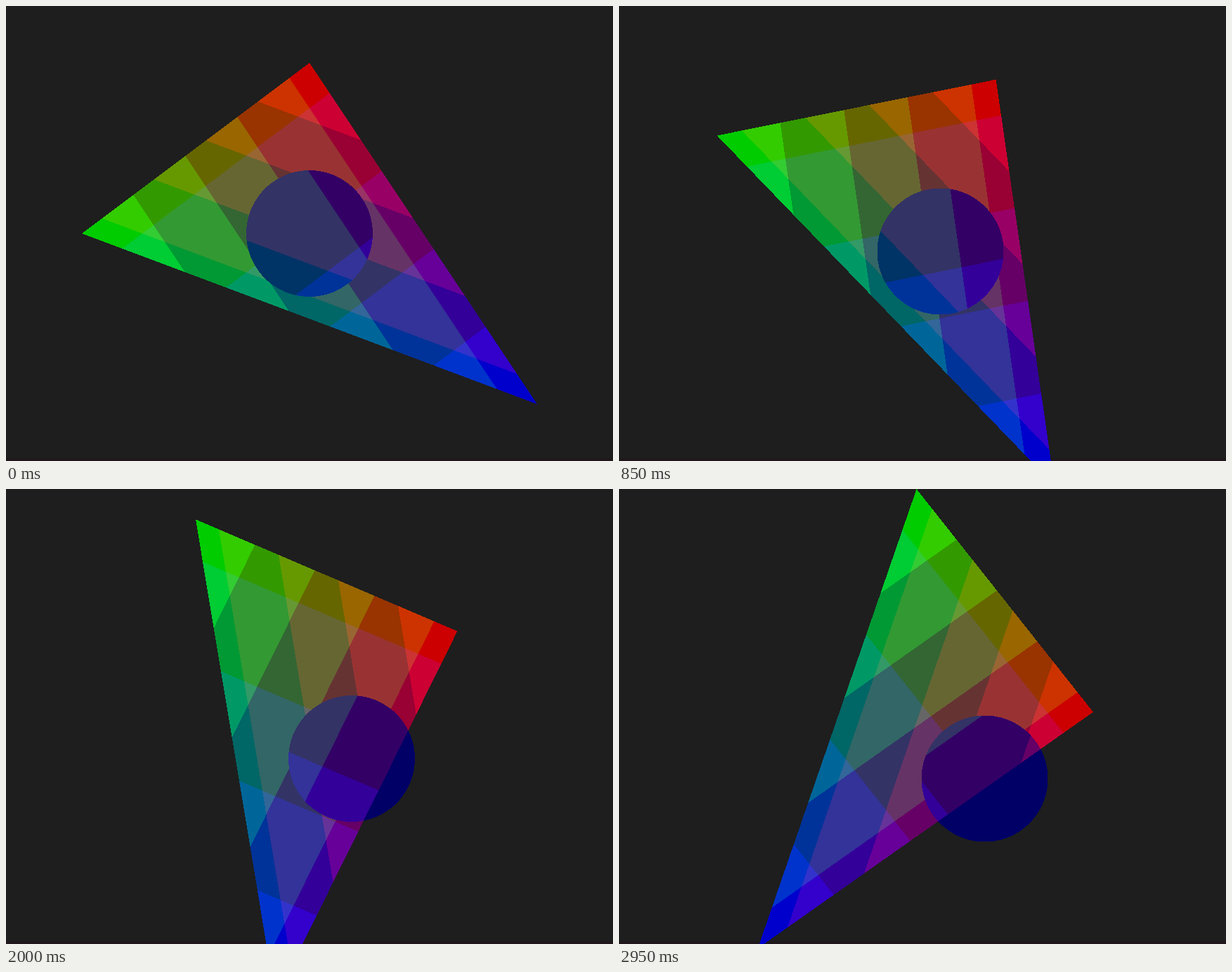
Animation of 864x648 px, one loop 3000 ms. Source, as an HTML page with a canvas:

```html
<!DOCTYPE html>
<html lang="en">
<head>
<meta charset="utf-8">
<title>Quantized triangle</title>
<style>
html, body { margin: 0; width: 100%; height: 100%; overflow: hidden; background: #1e1e1e; }
canvas { display: block; }
</style>
</head>
<body>
<canvas width="864" height="648"></canvas>
<script>
const W = 864, H = 648, STEP = 50, LOOP = 3000, RADIUS = 90;
const ctx = document.querySelector('canvas').getContext('2d');
const image = ctx.createImageData(W, H);
const pixels = new Uint32Array(image.data.buffer);

const rgb = (r, g, b) => (255 << 24 | b << 16 | g << 8 | r) >>> 0;
const BACK = rgb(30, 30, 30), STRIP = rgb(32, 24, 28), DISC = rgb(0, 0, 102);

// Corner weights become channel values in steps of 51.
const level = w => 51 * Math.floor((w - 0.0885) / 0.2283 + 1);
const dimLevel = w => 51 * Math.max(0, Math.floor((w - 0.2145) / 0.5705 + 1));

function draw(time) {
  const shift = time * 0.03; // degrees of turn, and pixels of disc travel
  const angle = shift * Math.PI / 180;
  const cos = Math.cos(angle), sin = Math.sin(angle);
  let i = 0;
  for (let row = 0; row < H; row++) {
    const y = row + 0.5 - H / 2;
    for (let col = 0; col < W; col++) {
      const x = col + 0.5 - W / 2;
      const u = x * cos + y * sin, v = y * cos - x * sin;
      const r = (0.375 * (u + 324) - v) / 364.5;
      const b = (v + 0.75 * u + 243) / 729;
      const g = 1 - r - b;
      const inTriangle = r >= 0 && g >= 0 && b >= 0;
      const inDisc = (x - shift) ** 2 + (y - shift) ** 2 < RADIUS * RADIUS;
      let color = row < H - 4 ? BACK : STRIP;
      if (inTriangle && inDisc) color = rgb(dimLevel(r), dimLevel(g), b < 0.433 ? 102 : 153);
      else if (inTriangle) color = rgb(level(r), level(g), level(b));
      else if (inDisc) color = DISC;
      pixels[i++] = color;
    }
  }
  ctx.putImageData(image, 0, 0);
}

let shown = -1;
function tick() {
  const time = Math.floor(performance.now() % LOOP / STEP) * STEP;
  if (time !== shown) draw(shown = time);
  requestAnimationFrame(tick);
}
tick();
</script>
</body>
</html>
```
